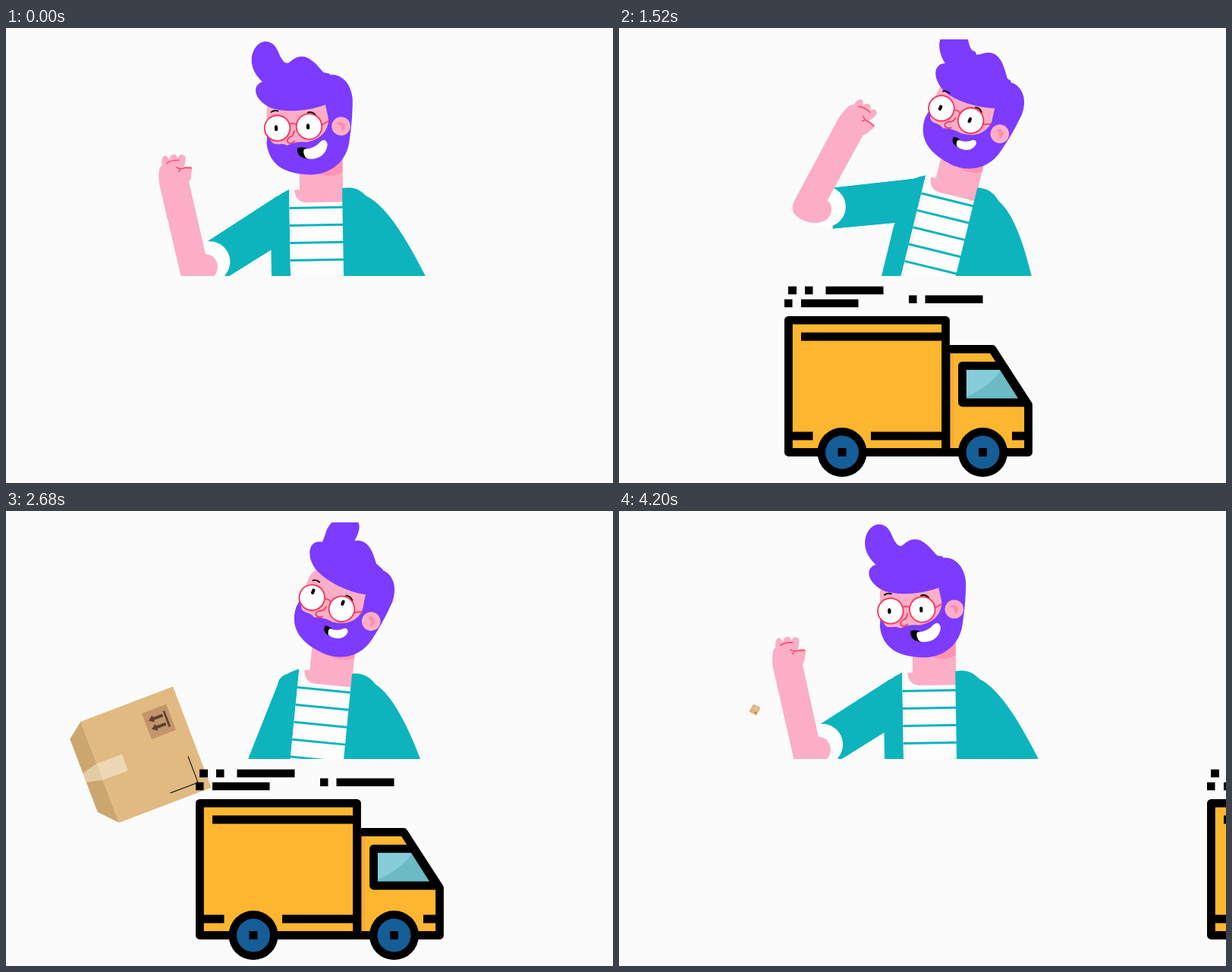
Write an HTML page with a canvas that moves like this. It is 800 px wide and 600 px high and loops after 4.24 s.

```html
<!DOCTYPE html>
<html lang="en">
<head>
<meta charset="utf-8">
<title>Delivery</title>
<style>
  html, body { margin: 0; width: 100%; height: 100%; overflow: hidden; background: #fbfbfb; }
  canvas { display: block; width: 800px; height: 600px; }
</style>
</head>
<body>
<canvas id="stage" width="800" height="600"></canvas>
<script>
const g = document.getElementById('stage').getContext('2d');
const LOOP = 4240, STEP = 40;
const PURPLE = '#7c3bff', TEAL = '#0db4bd', PINK = '#fbaec6', RED = '#ff2d55';
const YELLOW = '#fdb62f', BLACK = '#000', WHITE = '#fff';

// ---------- helpers ----------
const clamp = v => Math.max(0, Math.min(1, v));
const mix = (a, b, k) => a + (b - a) * k;
const smooth = v => { const k = clamp(v); return k * k * (3 - 2 * k); };
const ramp = (t, start, length) => smooth((t - start) / length);
// Rises to 1 at the peak and falls back to 0, reach ms on either side
const bump = (t, peak, reach) => smooth(1 - Math.abs(t - peak) / reach);

function turn(x, y, deg) {
  g.translate(x, y);
  g.rotate(deg * Math.PI / 180);
  g.translate(-x, -y);
}

function group(draw) {
  g.save();
  draw();
  g.restore();
}

function fill(path, color) {
  g.fillStyle = color;
  g.fill(new Path2D(path));
}

function stroke(path, color, width) {
  g.strokeStyle = color;
  g.lineWidth = width;
  g.stroke(new Path2D(path));
}

function rect(x, y, w, h, color) {
  g.fillStyle = color;
  g.fillRect(x, y, w, h);
}

function disc(x, y, r, color) {
  g.fillStyle = color;
  g.beginPath();
  g.arc(x, y, r, 0, 7);
  g.fill();
}

// ---------- man ----------
const SLEEVE = 'M358 221L262 272L284 321L372 276Z';
const FOREARM = 'M218 188L224 312Q226 327 240 327Q252 328 262 322Q275 315 274 302Q272 290 261 288' +
  'L257 190Q261 187 262 180Q266 173 262 170Q256 170 254 170Q259 161 258 156Q253 150 248 157' +
  'Q247 150 242 151Q238 152 237 157Q234 149 230 151Q226 154 226 162Q219 165 218 188Z';
const JACKET = 'M445 211C462 208 470 215 477 222C505 236 533 288 552 327L592 420H445Z';
const SKULL = 'M378 46C386 41 390 35.5 399 35.5C412 36 421 50 431 62.5C446 58 463 70 464 95' +
  'C463 115 461 130 457 150C452 178 430 192 405 192C372 190 350 178 348 148L350 130L362 70Z';
const FACE = 'M350 108C350 92 362 82 380 82H427C427 108 431 112 431 122C428 138 418 146 400 149' +
  'C388 147 380 150 375 152C368 147 362 152 356 148C351 142 349 130 350 108Z';
const FRINGE = 'M337 80C336 72 341 68 347 66L346 58L372 45L435 60L440 95L427 101' +
  'C405 108 375 109 357 102C346 97 338 88 337 80Z';
const TUFT = 'M352 72C338 60 333 48 333.5 38C334 24 343 13.5 353 13.5C364 14 368 24 371 33' +
  'C375 42 378 44 382 43.5L395 65Z';

function pose(t) {
  const sway = Math.sin(Math.PI * t / LOOP);
  const wave = bump(t, 1520, 620);    // leans over and waves
  const gaze = bump(t, 2680, 470);    // looks up
  const whip = bump(t, 3160, 430);    // hair swings after the head
  const glance = bump(t, 880, 380);
  const hang = ramp(t, 1960, 120);
  const down = hang * (1 - ramp(t, 3760, 220));
  const folded = hang * (1 - ramp(t, 3760, 420));
  return {
    down,
    lean: -1 + 2.2 * sway + 12.8 * wave + 4.6 * gaze,
    head: -2.8 + 4 * sway + 21.9 * wave + 20.1 * gaze,
    drop: 336 * bump(t, 2030, 430) + 4.5 * gaze - 2 * whip,
    arm: mix(-4 + 5.5 * sway + 7 * wave, -46, down),
    fore: mix(-10.5 + 16 * sway + 27 * wave, -170, folded),
    tuft: 25 * gaze - 12 * wave - 29 * whip,
    eyeX: -1.5 - 6.5 * glance,
    eyeY: 4 * glance - 8 * gaze,
    grin: 1 - .28 * Math.max(wave, gaze)
  };
}

function drawArm(p) {
  turn(365, 235, p.arm);
  disc(365, 235, 16, TEAL);
  fill(SLEEVE, TEAL);
  g.translate(-22 * p.down, 12 * p.down);
  fill(SLEEVE, TEAL);
  disc(264, 298, 27, WHITE);
  turn(256, 304, p.fore - p.lean - p.arm);
  fill(FOREARM, PINK);
  stroke('M232 161Q240 157 250 160M244 168Q249 173 255 171L264 173M249 172L246 175', RED, 1.2);
}

function drawBody(p) {
  group(() => drawArm(p));
  fill('M376 211Q366 215 357 222L350 287V420H376Z', TEAL);
  rect(375, 210, 71, 210, '#fdfdfd');
  rect(375, 213, 4, 207, '#f5f5f6');
  for (let y = 234.5; y < 400; y += 23) rect(375, y, 71, 3, TEAL);
  fill('M389 165H446V229H398Q383 228 382 212H389Z', PINK);
  fill('M402 186Q428 200 446 190V172Z', '#ff93b0');
  fill(JACKET, TEAL);
}

function drawHead(p) {
  fill(SKULL, PURPLE);
  fill(FACE, PINK);
  group(() => {
    turn(430, 80, p.tuft * .3);
    fill(FRINGE, PURPLE);
  });
  group(() => {
    turn(372, 75, p.tuft);
    fill(TUFT, PURPLE);
  });

  g.lineCap = 'round';
  stroke('M356 107Q360 104 365 106M404 110Q409 108 414 113', BLACK, 1.8);
  stroke('M380 124Q384 122 388 125M422 127Q426 125 432 122', RED, 1.6);
  stroke('M385 133Q384 140 379 141Q374 144 376 148Q380 151 385 147', RED, 1.6);
  for (const x of [363, 405]) {
    disc(x, 128.5, 16.8, WHITE);
    g.strokeStyle = RED;
    g.lineWidth = 1.8;
    g.stroke();
    g.lineCap = 'round';
    stroke(`M${x + p.eyeX} ${126.8 + p.eyeY}v3.4`, BLACK, 4.2);
  }

  disc(447, 130, 12.3, PINK);
  fill('M441 126Q447 121 452 128Q453 134 448 137Q449 130 441 126Z', '#f98fb0');

  group(() => {
    g.translate(408, 159);
    g.scale(mix(1, p.grin, .8), p.grin);
    g.translate(-408, -159);
    fill('M388 156Q394 154 400 157L402 171Q386 169 388 156Z', BLACK);
    fill('M397 158Q411 158 419 149Q426 144 428 153Q426 168 411 171Q398 173 397 166Q395 162 397 158Z', WHITE);
  });
}

function drawMan(t) {
  const p = pose(t);
  g.beginPath();
  g.rect(0, 15, 800, 312);
  g.clip();
  g.translate(0, p.drop);
  turn(461, 324, p.lean);
  drawBody(p);
  turn(418, 195, p.head - p.lean);
  drawHead(p);
}

// ---------- parcel ----------
function drawParcel(t) {
  if (t < 1800) return;
  const part = start => clamp((t - start) / 520);
  const slide = part(1800), rise = part(2320), fade = part(3720);
  g.translate(mix(356, 172, slide) + 7 * rise ** 3, mix(468, 262, rise));
  turn(0, 0, (rise - fade) * 360);
  g.scale(1 - fade, 1 - fade);
  fill('M-71 -54H71.5V76H-71Z', '#e1ba81');
  fill('M-48 -75.5H55L71.5 -54H-71Z', '#cba76f');
  fill('M-6 -75.5H7L12 -54H-11Z', '#e3cba4');
  rect(-11, -54, 23, 35.5, '#ecd8b6');
  rect(16.5, 25, 36.5, 34.5, '#c3956c');
  for (const x of [29, 41]) fill(`M${x} 30l5 7h-3v13h-4v-13h-3Z`, '#5d4131');
  rect(23.5, 52, 22.5, 2.6, '#5d4131');
  g.lineCap = 'butt';
  stroke('M-58.5 23V62H-21.5', '#222', 1.2);
}

// ---------- truck ----------
// Brakes to a stop, then pulls away
function truckLeft(t) {
  const s = (t - 2140) / 1000;
  return s < 0 ? 238 - 62.8 * (.06 - s) ** 3 : 238 + 84.8 * s ** 3 - 11.35 * s ** 4;
}

function drawTruck(t) {
  g.translate(Math.round(truckLeft(t)), 0);
  g.lineJoin = 'round';
  g.lineCap = 'butt';
  stroke('M5 346h11m11 0h10.5m17 0h76M0 363h10.5m11.5 0h75.5M164 357.7h10.5m11 0h76', BLACK, 10.6);

  g.beginPath();
  g.rect(0, 375, 327, 225);
  g.clip();
  const cab = 'M213 423.5H274L321.5 497V559.5H213Z';
  fill(cab, YELLOW);
  rect(217, 429, 6, 126, '#fba93a');
  stroke(cab, BLACK, 10.8);
  const cargo = 'M5.4 385.3H212.5V559.5H5.4Z';
  fill(cargo, YELLOW);
  stroke(cargo, BLACK, 10.8);
  stroke('M22 407H212M6 538H37.5M114 538H212M300 538H320', BLACK, 10.8);

  const glass = 'M234.5 445.3H287L318 494H234.5Z';
  fill(glass, '#6bbac4');
  fill('M234 445H288Q278 470 234 489Z', '#86cdd9');
  stroke(glass, BLACK, 10.8);

  for (const x of [76, 261.5]) {
    disc(x, 559.5, 32.5, BLACK);
    disc(x, 559.5, 22, '#155d96');
    rect(x - 5.5, 554, 11, 11, BLACK);
  }
}

// ---------- loop ----------
function frame(now) {
  const t = Math.floor((now % LOOP) / STEP) * STEP;
  rect(0, 0, 800, 600, '#fbfbfb');
  for (const draw of [drawMan, drawParcel, drawTruck]) group(() => draw(t));
  requestAnimationFrame(frame);
}
frame(0);
</script>
</body>
</html>
```
